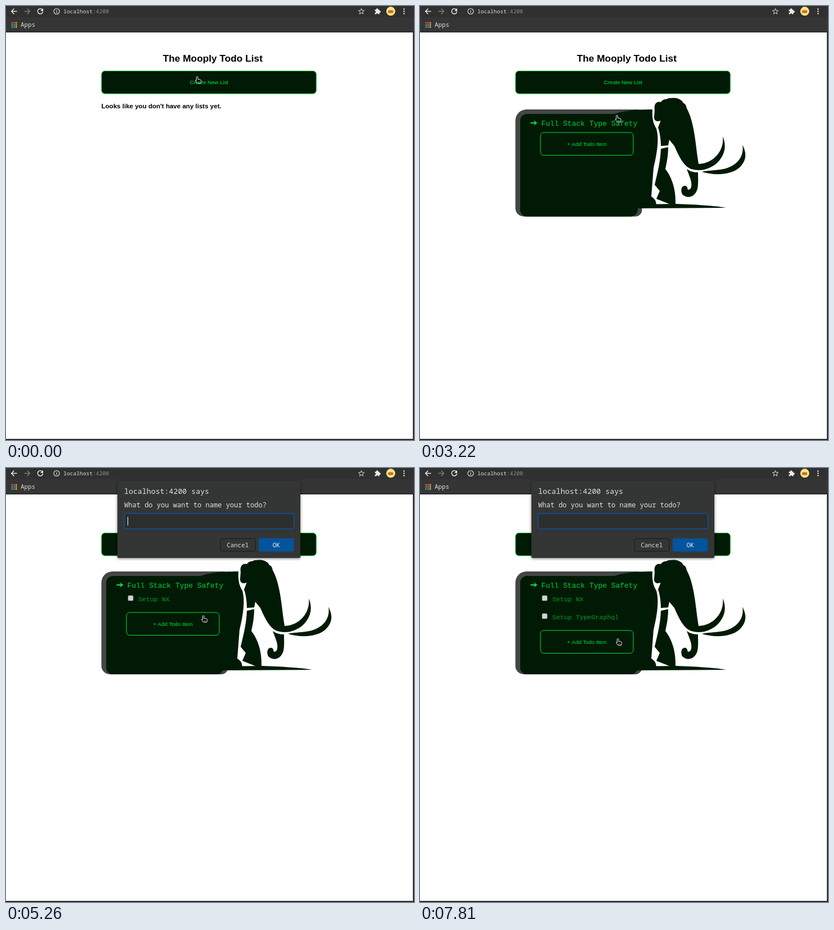
Write an HTML page with a canvas that moves like this. It is 725x772 px and loops after 8000 ms.

```html
<!DOCTYPE html>
<html lang="en">
<head>
<meta charset="utf-8">
<title>Todo List</title>
<style>
  html, body { margin: 0; width: 100%; height: 100%; overflow: hidden; background: #fff; }
  canvas { display: block; }
</style>
</head>
<body>
<canvas id="stage" width="725" height="772"></canvas>
<script>
const ctx = document.getElementById('stage').getContext('2d');
const LOOP = 8000;
const SANS = '"Liberation Sans", Arial, sans-serif';
const COURIER = '"Liberation Mono", "Courier New", monospace';
const MONO = '"Noto Sans Mono", "DejaVu Sans Mono", monospace';
const DARK = '#011a05', GREEN = '#00e23a';
const LIST_NAME = 'Full Stack Type Safety';
const LIST_AT = 3010;
const ITEMS = [{ at: 4600, name: 'Setup NX' }, { at: 7480, name: 'Setup TypeGraphql' }];

// keys: [time, characters typed]
const PROMPTS = [
  { open: 430, shown: 630, close: 2910, gone: 3110, kind: 'list', text: LIST_NAME,
    keys: [[820, 1], [1150, 3], [1250, 5], [1730, 7], [1870, 9], [1920, 11], [2110, 13],
           [2190, 15], [2260, 17], [2490, 19], [2680, 21], [2910, 22]],
    caret: t => t >= 1150 && !(t >= 1630 && t < 1730) },
  { open: 3460, shown: 3660, close: 4480, gone: 4680, kind: 'todo', text: ITEMS[0].name,
    keys: [[3800, 1], [4030, 3], [4220, 5], [4320, 7], [4460, 8]], caret: () => true },
  { open: 5180, shown: 5260, close: 7390, gone: 7570, kind: 'todo', text: ITEMS[1].name,
    keys: [[5640, 1], [5830, 3], [5920, 5], [6060, 7], [6160, 9], [6260, 11], [6690, 12],
           [6830, 14], [6920, 15], [7010, 17]], caret: () => true },
  { open: 7650, shown: 7810, close: 9000, gone: 9000, kind: 'todo', text: '', keys: [],
    caret: () => false }
];

// [time, x, y] of the pointer tip
const POINTER = [[0, 338, 125], [430, 338, 125], [630, 348, 148], [3060, 348, 148],
  [3380, 349, 239], [4560, 349, 239], [4710, 349, 262], [7480, 349, 262], [7660, 350, 303]];

function rect(x, y, w, h, fill) {
  ctx.fillStyle = fill;
  ctx.fillRect(x, y, w, h);
}

function box(x, y, w, h, r, fill, stroke, line = 1) {
  ctx.beginPath();
  ctx.roundRect(x, y, w, h, r);
  if (fill) { ctx.fillStyle = fill; ctx.fill(); }
  if (stroke) { ctx.strokeStyle = stroke; ctx.lineWidth = line; ctx.stroke(); }
}

function text(str, x, y, font, color, align = 'left') {
  ctx.font = font;
  ctx.fillStyle = color;
  ctx.textAlign = align;
  ctx.fillText(str, x, y);
}

function disc(x, y, r, fill) {
  ctx.beginPath();
  ctx.arc(x, y, r, 0, 7);
  ctx.fillStyle = fill;
  ctx.fill();
}

function line(d, color, width) {
  ctx.strokeStyle = color;
  ctx.lineWidth = width;
  ctx.stroke(new Path2D(d));
}

function shape(d, fill) {
  ctx.fillStyle = fill;
  ctx.fill(new Path2D(d));
}

const MAMMOTH = [
  // body and hind foot
  'M340 194C358 187 378 184 413 184C412 201 415 210 420 218C425 235 422 259 415 288L411 339Q419 343 420 353L380 356V210Z',
  // front leg
  'M428 254L441 251C441 268 438 280 436 290C447 304 455 325 454 353L445 353L420 343L426 329L417 318C422 296 427 279 428 254Z',
  // head with first tusk
  'M417 185C415 174 421 169 428 171C432 164 439 167 441 164C447 164 449 163 456 164C463 166 468 170 467 172C474 175 473 180 474 182C486 204 489 236 493 268L495 281C522 280 541 257 538 232C545 248 542 263 531 276C518 290 500 295 482 290C467 285 458 262 452 249L443 238L441 248L428 249C428 237 426 224 423 216C427 207 428 203 427 204C420 207 416 203 416 198Z',
  // second tusk
  'M501 295C512 292 522 293 533 291C560 288 577 270 573 247C582 264 579 277 567 288C550 302 521 301 501 295Z',
  // trunk
  'M474 290Q482 296 494 296C494 306 495 316 493 325C489 340 475 344 466 335C463 329 464 321 469 320C475 319 475 324 476 327C483 327 484 318 480 306Z',
  // ground
  'M380 353L455 352C487 353 521 355 544 359L380 360Z'
];

function drawBar() {
  rect(0, 0, 725, 20, '#303030');
  rect(0, 20, 725, 26, '#353535');
  rect(0, 46, 725, 1, '#1d1d1d');

  ctx.lineCap = 'round';
  line('M19 9.5H10M14 5L9.7 9.5L14 14', '#e8e8e8', 1.5);
  line('M33 9.5H42M38 5L42.3 9.5L38 14', '#7d7d7d', 1.5);
  line('M64.5 6.5A4.6 4.6 0 1 0 65.4 10.5', '#e8e8e8', 1.5);
  shape('M66 4V9H61Z', '#e8e8e8');
  line('M95 9.5A5 5 0 1 1 85 9.5A5 5 0 1 1 95 9.5M90 9V12', '#dcdcdc', 1.2);
  rect(89.4, 6.4, 1.3, 1.3, '#dcdcdc');
  ctx.lineCap = 'butt';

  const url = '9.65px ' + MONO;
  text('localhost', 102, 13, url, '#dedede');
  text(':4200', 154.1, 13, url, '#8b8b8b');

  ctx.beginPath();
  for (let i = 0; i < 10; i++) {
    const r = i % 2 ? 2.3 : 5.4, a = i * Math.PI / 5 - Math.PI / 2;
    ctx.lineTo(631.5 + r * Math.cos(a), 9.8 + r * Math.sin(a));
  }
  ctx.closePath();
  ctx.strokeStyle = '#dcdcdc';
  ctx.lineWidth = 1;
  ctx.stroke();

  rect(655.5, 6.5, 8, 8, '#ececec');
  disc(659.5, 6, 1.8, '#ececec');
  disc(664, 10.3, 1.8, '#ececec');
  disc(656, 10.5, 1.4, '#303030');
  disc(659.7, 14.4, 1.4, '#303030');

  disc(683.7, 9.3, 8, '#f6e584');
  box(679, 7.5, 9, 5, 1.5, '#d9642b');
  for (let i = 0; i < 3; i++) disc(707.3, 5.5 + i * 4, 1.2, '#e8e8e8');

  const dots = ['#e8503f', '#e8503f', '#f0a43a', '#48a85c', '#4a8fe0', '#f0a43a', '#48a85c', '#4a8fe0', '#e0b83a'];
  dots.forEach((c, i) => rect(9.5 + i % 3 * 3.7, 28.7 + Math.floor(i / 3) * 3.7, 2.6, 2.6, c));
  text('Apps', 26, 37.3, '10.83px ' + MONO, '#dedede');
}

function drawList(t) {
  const items = ITEMS.filter(i => t >= i.at);
  const bottom = items.length ? 367 : 374.5;
  box(169.5, 184, 225, bottom - 184, [20, 8, 12, 15], '#444645');
  MAMMOTH.forEach(d => shape(d, DARK));
  box(178, 192, 209, bottom - 192, [12, 4, 13, 12], DARK);

  line('M196.5 208H205', GREEN, 2.2);
  shape('M202.5 203.5L208.5 208L202.5 212.5L204 208Z', GREEN);
  text(LIST_NAME, 215.5, 212.8, '12.95px ' + COURIER, '#00d438');

  items.forEach((item, i) => {
    const y = 32 * i;
    box(217, 227 + y, 9, 9, 1.5, '#d4d6d4', '#8b8e8b', 0.8);
    text(item.name, 235, 236.8 + y, '11.6px ' + COURIER, '#009e2b');
  });

  const y = 225 + 32 * items.length;
  box(214, y, 165, 40.5, 6, DARK, GREEN);
  text('+ Add Todo Item', 296.5, y + 23.5, '9.63px ' + SANS, GREEN, 'center');
}

function drawPage(t) {
  rect(0, 0, 725, 772, '#fff');
  text('The Mooply Todo List', 367.3, 99, 'bold 17.3px ' + SANS, '#000', 'center');
  box(169.8, 115.6, 381.5, 40.5, 6, DARK, '#16c945');
  text('Create New List', 360.7, 139, '9.63px ' + SANS, GREEN, 'center');
  if (t >= LIST_AT) drawList(t);
  else text("Looks like you don't have any lists yet.", 169.5, 181.8, 'bold 11.56px ' + SANS, '#000');
  drawBar();
  rect(723, 47, 2, 725, '#2b2b2b');
  rect(0, 770, 725, 2, '#2b2b2b');
}

function drawPrompt(p, t) {
  const closing = t >= p.close;
  let lift, alpha;
  if (closing) {
    const q = (t - p.close) / (p.gone - p.close);
    lift = 11 * q;
    alpha = 1 - q * q;
  } else {
    alpha = Math.min(1, (t - p.open + 40) / (p.shown - p.open + 40));
    lift = 12 * (1 - alpha);
  }
  ctx.save();
  ctx.globalAlpha = alpha;
  ctx.translate(0, -Math.round(lift));

  ctx.save();
  ctx.shadowColor = 'rgba(0,0,0,.55)';
  ctx.shadowBlur = 5;
  ctx.shadowOffsetY = 1;
  box(198, 23, 325, 137, 2, '#343535');
  ctx.restore();

  text('localhost:4200 says', 210, 46.3, '13.25px ' + MONO, '#e2e2e2');
  text(`What do you want to name your ${p.kind}?`, 210, 70.3, '12.05px ' + MONO, '#e2e2e2');

  box(210, 80.7, 301.5, 27.3, 2, '#2d2e2e', closing ? '#292929' : '#0855a0', 1.4);
  const count = p.keys.reduce((n, [at, c]) => t >= at ? c : n, 0);
  text(p.text.slice(0, count), 216, 97.8, '10.83px ' + MONO, '#e6e6e6');
  if (!closing && p.caret(t)) rect(Math.round(215.6 + count * 6.5), 87, 1, 15, '#f2f2f2');

  const label = '10.83px ' + MONO;
  box(381, 125.5, 62, 22.5, 3, '#333434', '#171717');
  text('Cancel', 411.8, 140.8, label, '#dedede', 'center');
  box(449, 125, 62.5, 23.5, 3, '#02549d');
  text('OK', 480.3, 140.8, label, '#f0f0f0', 'center');
  ctx.restore();
}

const HAND = new Path2D('M0 1Q1.3 -.6 2.6 1V5L7 5.8Q8.5 6.2 8.3 8L7.4 12H1.6L-1.6 8Q-2 6.4 -.4 7L0 7.5Z');
const ARROW = new Path2D('M0 0V11L2.6 8.8L4.4 12.6L6.2 11.8L4.6 8H8Z');

function drawPointer(t) {
  let i = POINTER.length - 1;
  while (POINTER[i][0] > t) i--;
  const a = POINTER[i], b = POINTER[i + 1] || a;
  const k = b === a ? 0 : (t - a[0]) / (b[0] - a[0]);
  const e = k * k * (3 - 2 * k);
  const arrow = t >= 520 && t < 2910;
  const icon = arrow ? ARROW : HAND;
  ctx.save();
  ctx.translate(a[1] + (b[1] - a[1]) * e + 0.3, a[2] + (b[2] - a[2]) * e + 0.3);
  ctx.fillStyle = '#080808';
  ctx.fill(icon);
  ctx.strokeStyle = '#f4f4f4';
  ctx.lineWidth = 1;
  ctx.lineJoin = 'round';
  ctx.stroke(icon);
  if (!arrow) line('M3 9V11M5 9V11', '#f4f4f4', 0.7);
  ctx.restore();
}

function draw() {
  const t = performance.now() % LOOP;
  drawPage(t);
  const prompt = PROMPTS.find(p => t >= p.open && t < p.gone);
  if (prompt) drawPrompt(prompt, t);
  drawPointer(t);
  requestAnimationFrame(draw);
}
draw();
</script>
</body>
</html>
```
